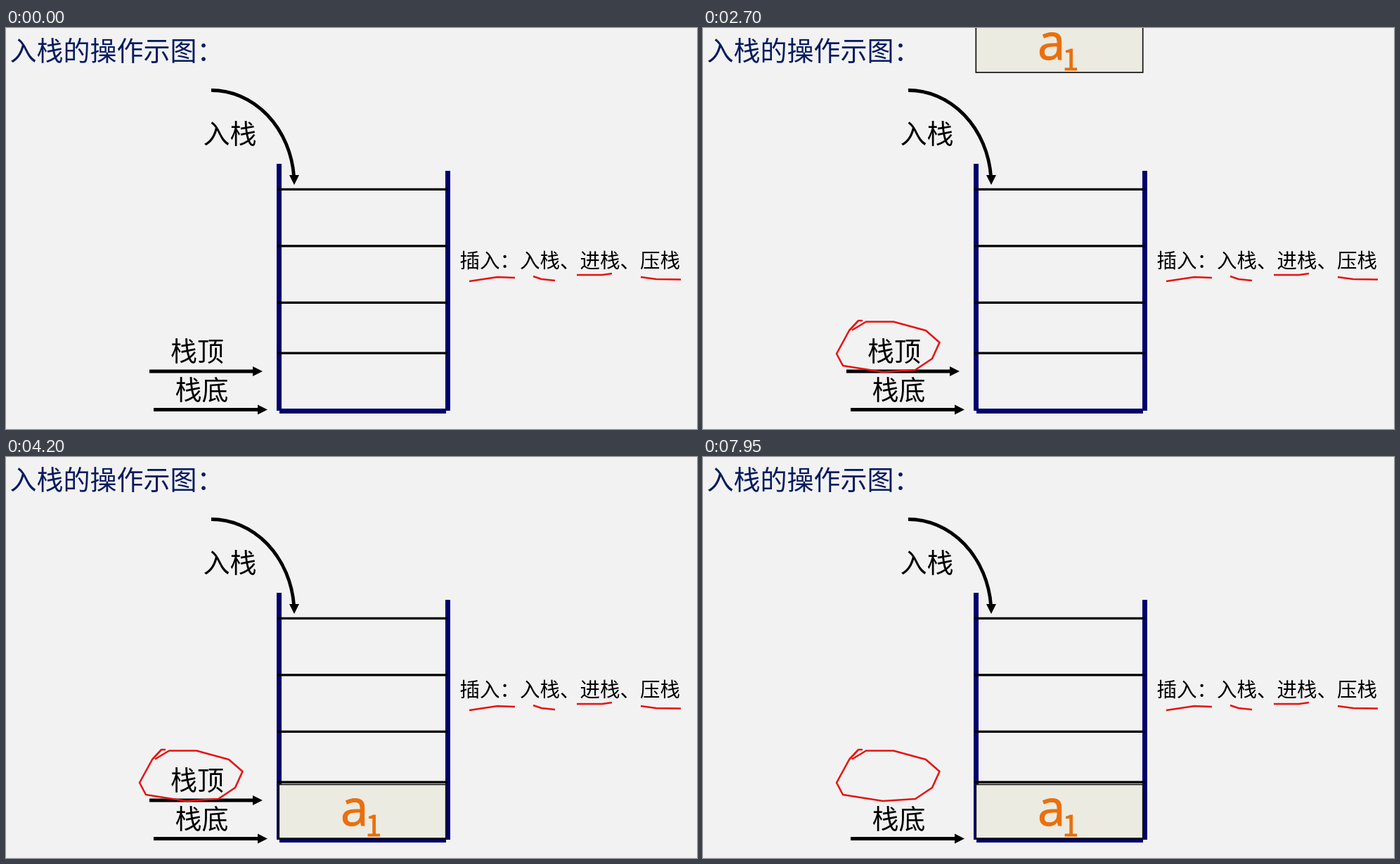
Animation of 983 by 570 pixels, one loop 8 s. Source, as an HTML page:

```html
<!DOCTYPE html>
<html lang="zh-CN">
<head>
<meta charset="utf-8">
<style>
  html, body { margin: 0; width: 100%; height: 100%; overflow: hidden; background: #f2f2f2; }
  svg { display: block; width: 100%; height: 100%; }
  text { font-family: "Noto Sans CJK SC", "Noto Sans CJK", sans-serif; font-size: 38px; }
  .wall { stroke: #00006b; stroke-width: 7; }
  .shelf { stroke: #000; stroke-width: 3.2; }
  .arrow { fill: none; stroke: #000; stroke-width: 4.8; }
  .pen { fill: none; stroke: #e81212; stroke-width: 2.6; stroke-linejoin: round; }
  #block text { fill: #e8700f; stroke: #e8700f; stroke-width: 1; }
</style>
</head>
<body>
<svg viewBox="0 0 983 570">
  <text x="5.5" y="45.5" fill="#061b5e">入栈的操作示图：</text>

  <path class="arrow" d="M292 88.5A118 134 0 0 1 409.6 211"/>
  <path d="M403 209h14l-7 14z"/>
  <text x="280.5" y="164">入栈</text>

  <path class="wall" d="M388.5 193V544M628.5 203V544M389 544.5H626"/>
  <path class="shelf" d="M386 229.3H628M386 309.8H628M386 390.3H628M386 462.1H628"/>

  <g id="block">
    <rect x="388.3" y="465.5" width="237.4" height="76.5" fill="#ecebe1" stroke="#111" stroke-width="1.7"/>
    <text x="476" y="524" style="font: 71px 'Open Sans', sans-serif">a</text>
    <text x="511.5" y="538.5" style="font-size: 41px">1</text>
  </g>

  <g id="topPointer">
    <text x="234" y="473">栈顶</text>
    <path class="arrow" d="M204 488H353"/>
    <path d="M351 481v14l14-7z"/>
  </g>
  <text x="240.5" y="528">栈底</text>
  <path class="arrow" d="M210 542.5H359"/>
  <path d="M358 535.5v14l14-7z"/>

  <text x="645.5" y="340.5" style="font-size: 28.5px">插入：入栈、进栈、压栈</text>
  <path class="pen" d="M659 360L699 354L724 355M750 353L762 357L781 359M812 351H848L862 349M903 354L925 357L960 357.5"/>
  <path class="pen" id="circle" pathLength="1" stroke-dasharray="1 2"
    d="M227 416H221L208 430L190 463L199 480L256 489L302 486L326 470L336.5 447L317 430L271 417.5H232L212 429.5"/>
</svg>
<script>
  const LOOP = 8000;
  const [block, topPointer, circle] =
    ["block", "topPointer", "circle"].map(id => document.getElementById(id));
  const progress = (t, start, end) => Math.min(1, Math.max(0, (t - start) / (end - start)));
  const show = (element, visible) => element.setAttribute("visibility", visible ? "visible" : "hidden");

  function draw(t) {
    const drawn = progress(t, 1670, 2400);
    show(circle, drawn > 0);
    circle.setAttribute("stroke-dashoffset", 1 - drawn);

    const fall = progress(t, 2647, 3110);
    show(block, fall > 0);
    block.setAttribute("transform", `translate(0 ${-542 * (1 - fall)})`);

    show(topPointer, t < 7650);
  }

  const begin = performance.now();
  function tick() {
    draw((performance.now() - begin) % LOOP);
    requestAnimationFrame(tick);
  }
  tick();
</script>
</body>
</html>
```
